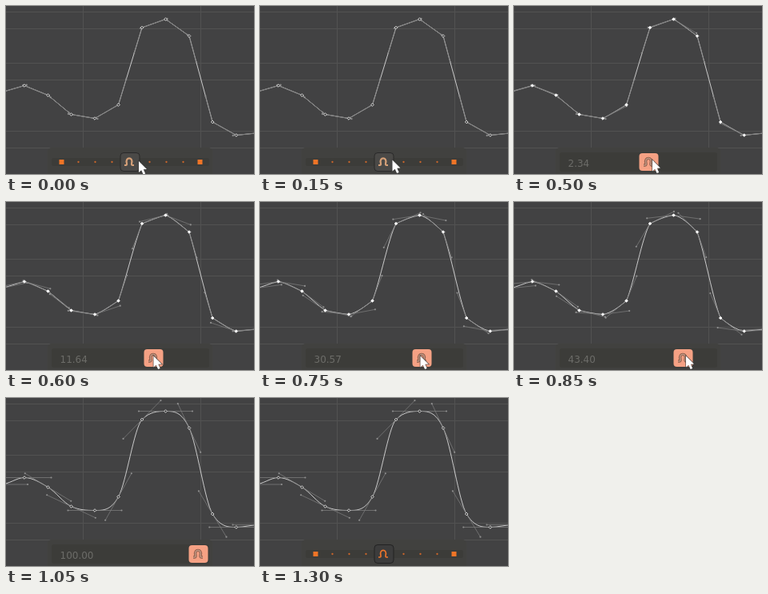
Animation of 310x210 px, one loop 1650 ms. Source, as an HTML page with a canvas:

```html
<!DOCTYPE html>
<html lang="en">
<head>
<meta charset="utf-8">
<title>Curve smoothing slider</title>
<style>
html, body { margin: 0; width: 100%; height: 100%; overflow: hidden; background: #424243; }
canvas { display: block; }
</style>
</head>
<body>
<canvas id="stage" width="310" height="210"></canvas>
<script>
const ctx = document.getElementById('stage').getContext('2d');
const LOOP = 1650, STEP = 50, TRAVEL = 85, ARM = 33.5;

// value units per pixel slope: tangents turn by angle in graph space
const ASPECT = 7;

// x, y, smoothed slope
const keys = [
  [-6.4, 108, 0], [23, 99.5, 0], [52.5, 111.5, .6], [81.5, 135.5, .47],
  [111, 140.5, 0], [140.5, 123.5, -1.79], [170, 27, -1.02], [199.5, 16.5, 0],
  [229, 37.5, 2.14], [258.2, 145, 1.66], [287.8, 161.5, 0], [317, 158.5, 0]
];

// slider offset and pointer x, one entry per step from 400 ms
const drag = [0, 6, 13, 21, 29, 35, 41, 47, 52, 56, 65, 74, 81, 85];
const pointer = [165.5, 168, 173, 178, 184.5, 190, 195, 200.5, 208, 215, 224, 234, 243];

const mix = (a, b, w) => a + (b - a) * w;
const chord = i => (keys[i + 1][1] - keys[i][1]) / (keys[i + 1][0] - keys[i][0]);
const turn = (a, b, w) => Math.tan(mix(Math.atan(a * ASPECT), Math.atan(b * ASPECT), w)) / ASPECT;

function line(x1, y1, x2, y2) {
  ctx.beginPath();
  ctx.moveTo(x1, y1);
  ctx.lineTo(x2, y2);
  ctx.stroke();
}

function dot(x, y, r) {
  ctx.beginPath();
  ctx.arc(x, y, r, 0, 7);
  ctx.fill();
}

function box(x, y, w, h, r, fill, border) {
  ctx.beginPath();
  ctx.roundRect(x, y, w, h, r);
  ctx.fillStyle = fill;
  ctx.fill();
  if (border) {
    ctx.strokeStyle = border;
    ctx.lineWidth = 1;
    ctx.stroke();
  }
}

function grid() {
  ctx.fillStyle = '#424243';
  ctx.fillRect(0, 0, 310, 210);
  ctx.strokeStyle = '#525252';
  ctx.lineWidth = 1;
  for (const x of [96.5, 243.5]) line(x, 0, x, 210);
  for (const y of [7.5, 28.5, 71.5, 92.5, 156.5, 177.5]) line(0, y, 310, y);
}

function handle(x, y, slope, dir) {
  const k = dir * ARM / Math.hypot(1, slope);
  const hx = x + k, hy = y + k * slope;
  ctx.strokeStyle = 'rgba(124,124,124,.85)';
  ctx.lineWidth = .9;
  line(x, y, hx, hy);
  ctx.fillStyle = '#8e8e8e';
  dot(hx, hy, 1.1);
}

function curve(w, solid) {
  const inSlope = i => turn(chord(i - 1), keys[i][2], w);
  const outSlope = i => turn(chord(i), keys[i][2], w);
  const last = keys.length - 1;

  ctx.beginPath();
  ctx.moveTo(keys[0][0], keys[0][1]);
  for (let i = 0; i < last; i++) {
    const [x0, y0] = keys[i], [x1, y1] = keys[i + 1], d = (x1 - x0) / 3;
    ctx.bezierCurveTo(x0 + d, y0 + d * outSlope(i), x1 - d, y1 - d * inSlope(i + 1), x1, y1);
  }
  ctx.strokeStyle = 'rgba(255,255,255,.8)';
  ctx.lineWidth = .9;
  ctx.stroke();

  keys.forEach(([x, y], i) => {
    if (i > 0) handle(x, y, inSlope(i), -1);
    if (i < last) handle(x, y, outSlope(i), 1);
  });

  for (const [x, y] of keys) {
    ctx.beginPath();
    ctx.moveTo(x - 1.8, y);
    ctx.lineTo(x, y - 1.8);
    ctx.lineTo(x + 1.8, y);
    ctx.lineTo(x, y + 1.8);
    ctx.closePath();
    ctx.fillStyle = solid ? '#fff' : '#333';
    ctx.fill();
    ctx.strokeStyle = '#fff';
    ctx.lineWidth = .8;
    ctx.stroke();
  }
}

function icon(x, color, width) {
  ctx.beginPath();
  ctx.moveTo(x - 6, 199);
  ctx.lineTo(x - 4.2, 199);
  ctx.quadraticCurveTo(x - 2.6, 199, x - 3.1, 196.5);
  ctx.bezierCurveTo(x - 5.4, 188.3, x + 5.4, 188.3, x + 3.1, 196.5);
  ctx.quadraticCurveTo(x + 2.6, 199, x + 4.2, 199);
  ctx.lineTo(x + 6, 199);
  ctx.strokeStyle = color;
  ctx.lineWidth = width;
  ctx.stroke();
}

function idlePanel(hover) {
  box(57, 190, 197, 10, 2, '#3c3c39');
  ctx.fillStyle = '#f07427';
  for (const x of [66.5, 239.5]) ctx.fillRect(x, 192, 6, 6);
  ctx.fillStyle = '#c9652b';
  for (const n of [-3, -2, -1, 1, 2, 3]) dot(156 + n * 21 + Math.sign(n) * 2.5, 195, 1.15);
  box(143, 183.5, 24, 23, 4, hover ? '#4a4947' : '#3c3c3c', hover ? '#292929' : '#222');
  icon(154, hover ? '#d5a078' : '#ee752b', hover ? 2.2 : 1.7);
}

function dragPanel(d) {
  box(57, 183, 197, 24, 3, '#3c3c39');
  ctx.fillStyle = '#6c6c68';
  ctx.font = '12px "DejaVu Sans", sans-serif';
  ctx.fillText((100 * (d / TRAVEL) ** 2).toFixed(2), 67.5, 200.5);
  const x = 155.5 + d;
  box(x - 12, 184, 24, 22, 4, '#f5a184');
  icon(x - .5, '#8c5a48', 3.4);
  icon(x - .5, '#c09580', 1.6);
}

function cursor(x, y) {
  const shape = [[0, 0], [0, 14], [3.2, 11.2], [5.6, 16.6], [8.2, 15.5], [5.8, 10.2], [10, 10]];
  ctx.beginPath();
  for (const [px, py] of shape) ctx.lineTo(x + px, y + py);
  ctx.closePath();
  ctx.strokeStyle = 'rgba(60,60,60,.7)';
  ctx.lineWidth = 1.6;
  ctx.stroke();
  ctx.fillStyle = '#fff';
  ctx.fill();
}

function draw(t) {
  const pressed = t >= 350 && t < 1300;
  const n = Math.max(0, Math.floor((t - 400) / STEP));
  const d = drag[Math.min(n, drag.length - 1)];

  grid();
  curve((d / TRAVEL) ** 2, t >= 350 && t < 1050);
  box(52, 177, 206, 40, 5, '#41413f');
  if (pressed) dragPanel(d);
  else idlePanel(t < 350);

  if (t < 50) cursor(166, 194);
  else if (t < 150) cursor(166, 193);
  else if (t < 1050) cursor(pointer[n], 192.5);
}

const start = performance.now();

function tick() {
  const t = (performance.now() - start) % LOOP;
  draw(t - t % STEP);
  requestAnimationFrame(tick);
}
tick();
</script>
</body>
</html>
```
